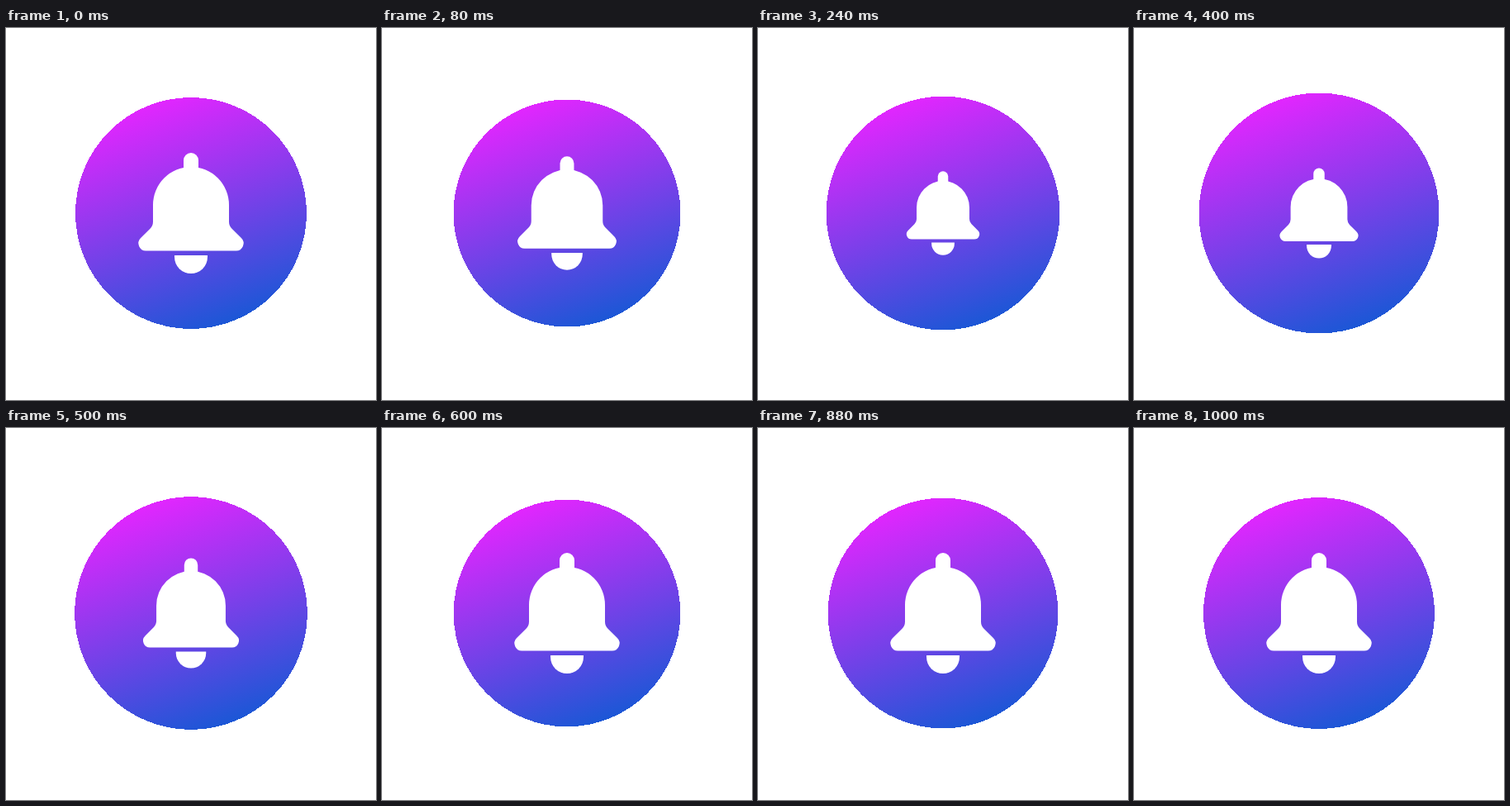
Recreate the animation shown at these times as an HTML page. Size 448 by 450 pixels, loop 1020 ms.

```html
<!DOCTYPE html>
<html lang="en">
<head>
<meta charset="utf-8">
<title>Bell button</title>
<style>
  html, body { margin: 0; width: 100%; height: 100%; overflow: hidden; background: #fff; }
  svg { display: block; width: 448px; height: 450px; }
</style>
</head>
<body>
<svg viewBox="0 0 448 450">
  <defs>
    <linearGradient id="fill" gradientUnits="userSpaceOnUse" x1="-48" y1="-131" x2="48" y2="131">
      <stop offset="0" stop-color="#e126fe"/>
      <stop offset="1" stop-color="#1c57d6"/>
    </linearGradient>
  </defs>
  <g id="disc"><circle r="140" fill="url(#fill)" shape-rendering="crispEdges"/></g>
  <g id="bell" fill="#fff">
    <path d="M-9 -50V-64A9 9 0 0 1 9 -64V-50Z"/>
    <path d="M-46 -10A46 46 0 0 1 46 -10V10.2A12 12 0 0 0 49.5 18.7L60.9 30.1
             A9 9 0 0 1 54.5 45.5H-54.5A9 9 0 0 1 -60.9 30.1L-49.5 18.7A12 12 0 0 0 -46 10.2Z"/>
    <path d="M-20 51V53A20 20 0 0 0 20 53V51Z"/>
  </g>
</svg>
<script>
  const LOOP = 1020, STEP = 20;
  // [time in ms, scale]
  const discKeys = [[0, 1], [100, 0.98], [380, 1.04], [600, 0.981], [1000, 1], [LOOP, 1]];
  const bellKeys = [[0, 1], [300, 0.659], [600, 1], [LOOP, 1]];
  const disc = document.getElementById('disc');
  const bell = document.getElementById('bell');

  const ease = u => u * u * (3 - 2 * u);

  function valueAt(keys, t) {
    const i = keys.findIndex(key => key[0] > t);
    const [t0, v0] = keys[i - 1], [t1, v1] = keys[i];
    return v0 + (v1 - v0) * ease((t - t0) / (t1 - t0));
  }

  function place(node, scale) {
    node.setAttribute('transform', `translate(224 224) scale(${scale})`);
  }

  function draw(t) {
    place(disc, valueAt(discKeys, t));
    place(bell, valueAt(bellKeys, t));
  }

  let start;
  function tick(now) {
    start ??= now;
    const t = (now - start) % LOOP;
    draw(Math.floor(t / STEP) * STEP);
    requestAnimationFrame(tick);
  }
  draw(0);
  requestAnimationFrame(tick);
</script>
</body>
</html>
```
